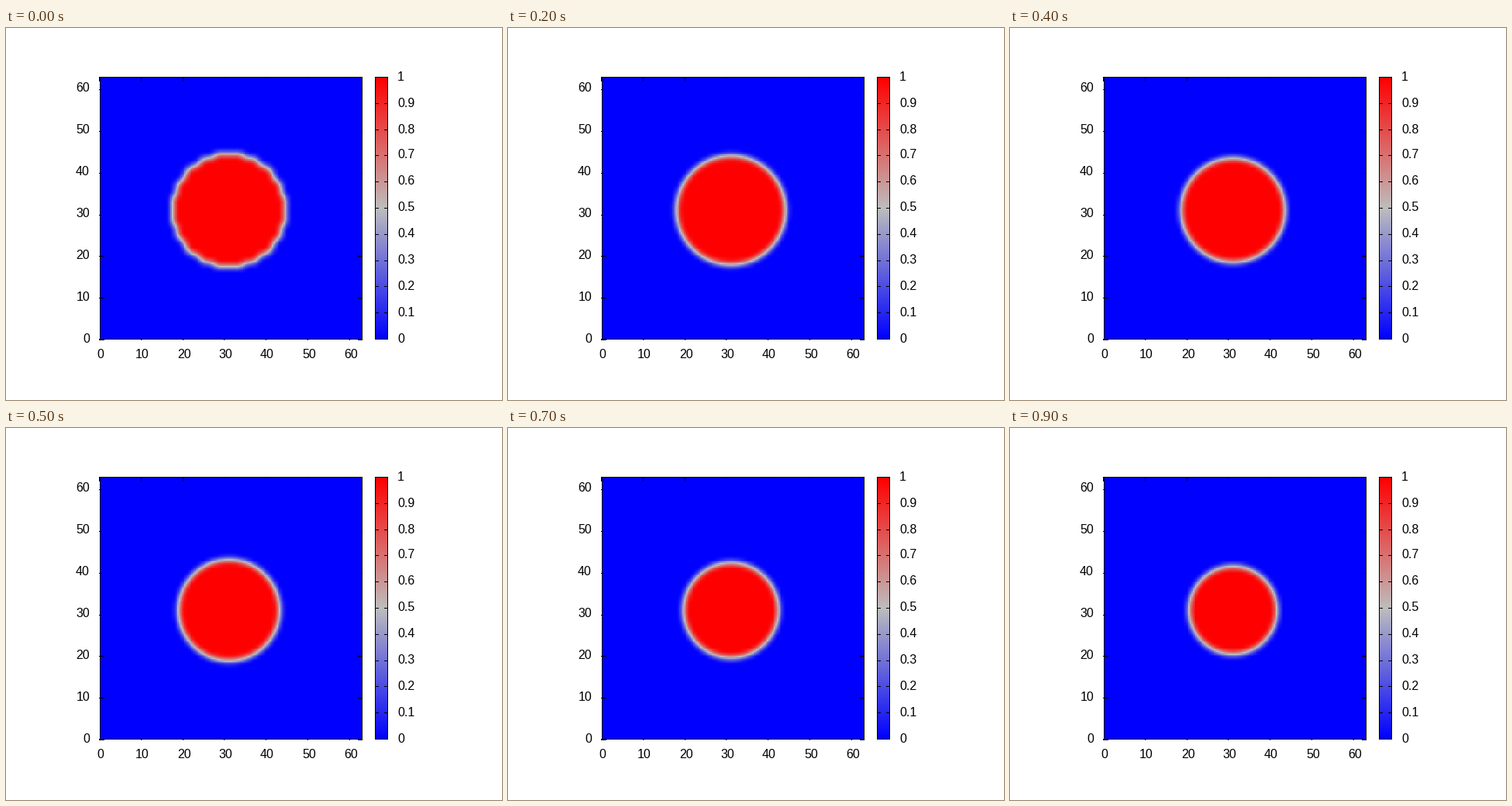
A matplotlib script for the animation above (1000 ms loop, 640x480 px).

```python
import numpy as np
import matplotlib.pyplot as plt
from matplotlib.animation import FuncAnimation
from matplotlib.colors import LinearSegmentedColormap
from matplotlib.patches import Rectangle

W, H, DPI = 640, 480, 100
FRAMES, INTERVAL = 10, 100
N, SUB, CENTER = 64, 3, 31
LEFT, RIGHT, TOP, BOTTOM = 120, 459, 63, 402
BAR_LEFT, BAR_RIGHT = 476, 492
SCALE = (RIGHT - LEFT) / (N - 1)
FACE_WIDTH = 3.0

grid = np.arange(N) - CENTER
dist2 = grid[:, None] ** 2 + grid[None, :] ** 2

# Hat-function weights from grid nodes to the centres of the drawn cells
cells = (np.arange((N - 1) * SUB) + 0.5) / SUB
weights = np.clip(1 - np.abs(cells[:, None] - np.arange(N)), 0, 1)

palette = LinearSegmentedColormap.from_list(
    "phase", ["#0000ff", "#bebebe", "#ff0000"], N=256)


def soften(u):
    for axis in (0, 1):
        u = (np.roll(u, 1, axis) + 2 * u + np.roll(u, -1, axis)) / 4
    return u


def phase(i):
    """Shrinking disc: a softened lattice disc first, then a round front."""
    if i == 0:
        return soften((dist2 <= 13.5 ** 2).astype(float))
    t = i - 1
    radius = np.sqrt(178 - 7.1 * t - 0.16 * t * t)
    offset = np.clip((np.sqrt(dist2) - radius) / FACE_WIDTH, -0.5, 0.5)
    return 0.5 - 0.5 * np.sin(np.pi * offset)


def field(i):
    return weights @ phase(i) @ weights.T


fig = plt.figure(figsize=(W / DPI, H / DPI), dpi=DPI, facecolor="white")
ax = fig.add_axes([0, 0, 1, 1])
ax.axis("off")


def block(x, y, w, h):
    ax.add_patch(Rectangle((x, y), w, h, fc="black", lw=0, aa=False, zorder=3))


def frame(x0, x1, y0, y1):
    block(x0, y0, x1 - x0 + 1, 1)
    block(x0, y1, x1 - x0 + 1, 1)
    block(x0, y0, 1, y1 - y0 + 1)
    block(x1, y0, 1, y1 - y0 + 1)


def label(x, y, text, align):
    ax.text(x, y, text, ha=align, va="baseline", color="black",
            family="Liberation Sans", size=16 * 72 / DPI)


image = ax.imshow(field(0), cmap=palette, vmin=0, vmax=1, origin="lower",
                  extent=(LEFT + .5, RIGHT + .5, BOTTOM + .5, TOP + .5),
                  interpolation="nearest", aspect="auto")
ax.imshow(np.linspace(0, 1, 256)[:, None], cmap=palette, vmin=0, vmax=1,
          origin="lower", interpolation="nearest", aspect="auto",
          extent=(BAR_LEFT, BAR_RIGHT + 1, BOTTOM, TOP))
ax.set_xlim(0, W)
ax.set_ylim(H, 0)

frame(LEFT + 1, RIGHT, TOP, BOTTOM - 1)
frame(BAR_LEFT, BAR_RIGHT, TOP, BOTTOM - 1)

for value in range(0, 61, 10):
    x = round(LEFT + value * SCALE)
    y = round(BOTTOM - value * SCALE)
    size = 6 if value <= 20 else 2
    block(LEFT, y, size + 1, 1)
    block(RIGHT - size + 1, y, size, 1)
    block(x, TOP, 1, size)
    block(x, BOTTOM - 1, 1, 2)
    label(x + 2, 426.5, str(value), "center")
    label(108, y + 3.5, str(value), "right")

for k in range(11):
    y = round(BOTTOM - 1 - k * (BOTTOM - TOP - 1) / 10)
    block(BAR_LEFT, y, 5, 1)
    block(BAR_RIGHT - 4, y, 5, 1)
    label(505, y + 4.5, f"{k / 10:g}", "left")


def update(i):
    image.set_data(field(i))
    return [image]


animation = FuncAnimation(fig, update, frames=FRAMES, interval=INTERVAL,
                          repeat=True, repeat_delay=0, blit=False)
plt.show()
```
